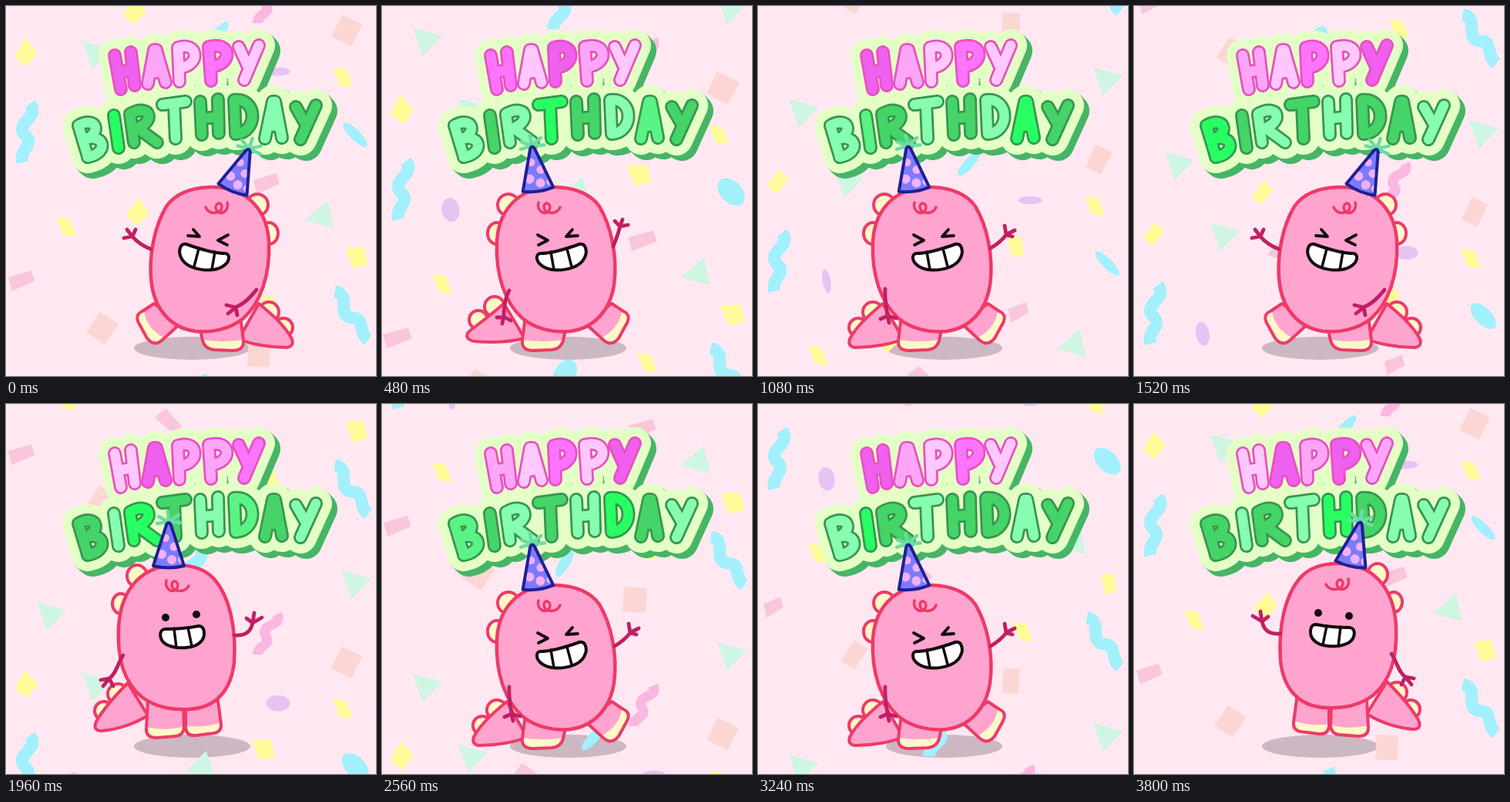
An HTML page with a canvas for the animation above (3840 ms loop, 480 by 480 pixels).

```html
<!DOCTYPE html>
<html lang="en">
<head>
<meta charset="utf-8">
<title>Happy Birthday</title>
<style>
  html, body { margin: 0; width: 100%; height: 100%; overflow: hidden; background: #ffe8f1; }
  canvas { display: block; width: 480px; height: 480px; }
</style>
</head>
<body>
<canvas id="stage" role="img" aria-label="Happy Birthday"></canvas>
<script>
const LOOP = 3840, STEP = 40, FRAMES = LOOP / STEP;
const canvas = document.getElementById('stage');
const ctx = canvas.getContext('2d');
const dpr = window.devicePixelRatio || 1;
canvas.width = canvas.height = 480 * dpr;

const path = d => new Path2D(d);
const TAU = Math.PI * 2;

function stroke(p, color, width) {
  ctx.strokeStyle = color;
  ctx.lineWidth = width;
  ctx.stroke(p);
}
function shape(p, fill, line, width = 4) {
  ctx.fillStyle = fill;
  ctx.fill(p);
  if (line) stroke(p, line, width);
}
function disc(x, y, rx, ry = rx) {
  const p = new Path2D();
  p.ellipse(x, y, rx, ry, 0, 0, TAU);
  return p;
}

// ---------- confetti ----------
const KINDS = {
  yellow: { fill: '#fdfb97', d: path('M-16-12L10-13L16 10L-6 14Z'), flip: 'x' },
  slant: { fill: '#fdfb97', d: path('M-13-12L4-10L13 13L-4 11Z') },
  orange: { fill: '#fcd6d3', d: path('M-16-16H16V16H-16Z'), flip: 'x' },
  pink: { fill: '#f9c6dc', d: path('M-19-4L14-13L19 1L-14 14Z'), flip: 'x' },
  tri: { fill: '#cff5e3', d: path('M-18-16L20-6L-5 21Z') },
  oval: { fill: '#a3f0fd', d: disc(0, 0, 21, 14), flip: 'y' },
  bead: { fill: '#e7c3f3', d: disc(0, 0, 15.5, 11.5), flip: 'y' },
  wave: { line: '#a3f0fd', d: path('M4-38C18-20-16-14-3 2C12 14-10 20-6 38') },
  curl: { line: '#fab7e2', d: path('M3-29C15-16-14-11-3 2C10 12-9 16-5 29') }
};
const CONFETTI = [
  ['yellow', 25, 61, 50], ['yellow', 166, 7, 50], ['yellow', 170, 268, 60],
  ['yellow', 455, 326, 0], ['yellow', 334, 145, 0], ['slant', 437, 92, 0],
  ['slant', 78, 286, 0], ['slant', 344, 388, 0],
  ['orange', 442, 32, 26], ['orange', 125, 418, 33], ['orange', 328, 452, 3],
  ['pink', 20, 356, 0], ['pink', 338, 230, 0], ['pink', 211, 314, 65], ['pink', 190, 86, 50],
  ['tri', 117, 62, 0], ['tri', 411, 272, -55], ['tri', 58, -30, 0],
  ['tri', 453, -71, 0], ['tri', 255, 167, -60],
  ['oval', 453, 167, 45], ['oval', 274, 37, -48], ['oval', 237, 404, -60],
  ['bead', 89, 190, 80], ['bead', 353, 85, 0],
  ['wave', 27, 165, 0], ['wave', 449, 401, -42], ['wave', 238, 515, 16], ['curl', 340, -4, 18]
];
const SPAN = 594, MARGIN = 62;
const dip = (f, at, period, depth) => 1 - depth * (1 + Math.cos(TAU * (f - at) / period));

function drawConfetti(f) {
  const fall = SPAN * f / FRAMES;
  const sx = dip(f, 33, 48, 0.17), sy = dip(f, -3, 32, 0.28);
  ctx.lineCap = 'butt';
  for (const [kind, x, y, angle] of CONFETTI) {
    const k = KINDS[kind];
    ctx.save();
    ctx.translate(x, (y + fall + MARGIN + SPAN) % SPAN - MARGIN);
    ctx.rotate(angle * Math.PI / 180);
    if (k.flip) ctx.scale(k.flip === 'x' ? sx : 1, k.flip === 'y' ? sy : 1);
    if (k.line) stroke(k.d, k.line, kind === 'wave' ? 16 : 13);
    else shape(k.d, k.fill);
    ctx.restore();
  }
}

// ---------- lettering ----------
const HAPPY = [
  'M141 64L149 108M162 60L167 103M146 86L164 83',
  'M184 101L192 57H195L207 99M188 87L203 85',
  'M223 54L225 98M223 54C250 45 253 78 225 80',
  'M263 53L266 97M263 53C292 45 295 76 266 79',
  'M302 53L313 77M328 51L309 96'
].map(path);
const BIRTHDAY = [
  'M94 155L106 195M94 155C117 142 126 165 101 174C126 163 136 190 106 196',
  'M140 142L146 184',
  'M161 141L166 177M161 140C188 125 196 152 165 160M173 160L196 177',
  'M203 128L233 124M218 126L220 172',
  'M252 124L254 167M275 121L276 165M253 146L275 144',
  'M296 122L298 166C328 164 326 118 296 122Z',
  'M336 172L346 124H349L358 171M341 156L354 155',
  'M376 131L388 152M402 129L382 173'
].map(path);
const SIGN = new Path2D();
[...HAPPY, ...BIRTHDAY].forEach(p => SIGN.addPath(p));

const PINKS = { m: '#f060ee', h: '#ff74fd', l: '#fda6f8', p: '#ffc8fd' };
const GREENS = { d: '#45d468', m: '#5bf386', l: '#86fdb0' };
const HOT = '#27ff62';
const LOOKS = [
  ['mlphp', 'lldlddld'], ['hpmlp', 'ldlldlmd'], ['mlphp', 'lmdldlld'],
  ['pmllh', 'dlddlmdl'], ['lphpm', 'mdldlddl'], ['pmlml', 'dldlddll']
];
const ORDER = '05143214530541350145';

function word(letters, line, colorOf) {
  letters.forEach((p, i) => {
    stroke(p, line, 18);
    stroke(p, colorOf(i), 12.5);
  });
}
function drawSign(f) {
  const step = Math.floor(f / 5);
  const [pinks, greens] = LOOKS[ORDER[step]];
  const hot = (step + 1) % 8;
  ctx.lineCap = ctx.lineJoin = 'round';
  for (let i = 7; i > 0; i--) {
    ctx.save();
    ctx.translate(i, i);
    stroke(SIGN, '#47b566', 42);
    ctx.restore();
  }
  stroke(SIGN, '#e4ffc6', 42);
  word(HAPPY, '#e94fc4', i => PINKS[pinks[i]]);
  word(BIRTHDAY, '#36964f', i => i === hot ? HOT : GREENS[greens[i]]);
}

// ---------- dancer ----------
const LINE = '#ee3a68', SKIN = '#ffa3cf', CREAM = '#fff8c8', ARM = '#c21f63', INK = '#140a0e';

const DOWN = {
  axis: 245,
  body: path('M226 235C185 233 152 258 149 305C147 350 160 385 182 405C200 420 225 424 244 422C275 418 296 395 301 362C306 325 297 285 282 260C270 243 250 236 226 235Z'),
  spikes: [disc(164, 258, 14), disc(149, 295, 12, 14)],
  tail: path('M162 386C145 400 128 415 119 432Q116 442 126 443C150 443 175 438 188 432Z'),
  plates: [disc(130, 417, 12), disc(149, 397, 13)],
  legs: [
    ['M186 403L182 434Q181 447 196 447L220 446Q232 445 235 434L239 416Z', 'M182 434Q181 447 196 447L220 446Q232 445 235 433Q210 437 182 433Z'],
    ['M264 412L288 434Q298 442 307 431L318 411Q323 400 313 396L298 386Z', 'M284 431Q298 442 307 431L318 411Q323 400 311 396Q308 418 284 431Z']
  ].map(l => l.map(path)),
  wave: path('M302 314Q314 307 322 297M322 297L320 285M323 296L333 291M322 297L330 299'),
  rest: path('M165 367C164 380 167 392 168 402M168 402L159 406M168 402L170 411M168 402L179 405'),
  hair: path('M203 255C200 266 212 273 217 265C221 257 211 252 210 260C210 271 228 271 231 261'),
  eyes: path('M202 297L215 304L203 310M247 290L239 299L254 298'),
  mouth: path('M205 321C220 321 245 313 256 309C264 307 267 318 263 326C256 342 225 347 209 338C199 332 199 322 205 321Z'),
  teeth: path('M219 319L223 342M240 315L246 338')
};
const SETTLE = {
  ...DOWN,
  tail: path('M158 386C140 402 122 415 112 423Q106 432 120 435C140 437 165 436 185 431Z'),
  plates: [disc(125, 407, 12), disc(146, 390, 13)],
  wave: path('M300 312C304 302 307 294 309 285M309 286L302 279M309 286L312 277M309 286L319 284'),
  rest: path('M165 369C159 380 158 392 158 404M158 404L149 404M158 403L156 412M158 403L167 408')
};
const DOWN_RIGHT = {
  ...DOWN,
  wave: path('M303 315Q318 309 326 299M326 299L322 290M326 299L333 290M326 299L337 301'),
  rest: path('M165 368C173 378 182 388 194 391M192 391L204 388M192 391L202 399M192 391L190 401')
};
const UP = {
  axis: 243,
  open: true,
  body: path('M222 209C178 209 149 238 146 290C144 335 155 362 176 380C195 394 215 397 238 396C272 394 292 372 296 335C299 290 290 250 270 227C258 214 240 209 222 209Z'),
  spikes: [disc(170, 223, 13, 14), disc(149, 259, 11, 13)],
  tail: path('M158 362C140 380 125 398 117 412Q112 424 124 424C148 422 170 413 184 404Z'),
  plates: [disc(127, 398, 12), disc(145, 376, 13)],
  legs: [
    ['M184 385L182 422Q182 433 195 433L220 431Q230 430 231 420L230 392Z', 'M182 419Q182 433 195 433L220 431Q230 430 231 418Q208 425 182 419Z'],
    ['M233 392L233 420Q234 431 246 430L270 427Q280 425 279 415L274 378Z', 'M233 417Q234 431 246 430L270 427Q280 425 279 413Q256 421 233 417Z']
  ].map(l => l.map(path)),
  wave: path('M296 300C308 301 318 297 320 283M320 284L312 278M320 284L322 271M320 284L332 277'),
  rest: path('M152 326C144 338 143 350 134 356M134 356L123 358M134 356L126 366M134 356L139 366'),
  hair: path('M208 229C205 240 217 247 222 239C226 231 216 226 215 234C215 245 233 245 237 236'),
  eyes: [disc(207, 277, 5), disc(247, 273, 5)],
  mouth: path('M206 292C222 292 240 290 250 288C258 288 259 300 254 307C245 319 220 318 208 312C198 306 198 293 206 292Z'),
  teeth: path('M218 291L221 316M236 290L241 314')
};

const HAT = path('M-20 0Q0 5 20 0L3-53Q0-59-3-53Z');
const DOTS = [[-4, -36, 5], [7, -25, 5.5], [-9, -15, 6], [4, -8, 6], [17, -8, 5]];
const POM = path('M0-57L-1-71M0-57L-13-64M0-57L13-66M0-57L-15-55M0-57L16-56');

function drawHat(x, y, angle) {
  ctx.save();
  ctx.translate(x, y);
  ctx.rotate(angle * Math.PI / 180);
  stroke(POM, '#6ddca4', 4.5);
  shape(HAT, '#7c7bfd');
  ctx.save();
  ctx.clip(HAT);
  for (const d of DOTS) shape(disc(...d), '#f2b0f4');
  ctx.restore();
  stroke(HAT, '#1f1f96', 4);
  ctx.restore();
}

function drawDancer(f) {
  const phase = f % 9, right = f % 18 < 9, up = phase > 3;
  const pose = up ? UP : phase === 3 ? SETTLE : right ? DOWN_RIGHT : DOWN;
  ctx.save();
  if (up && phase > 4) ctx.translate(0, -2);
  ctx.save();
  if (right) {
    ctx.translate(pose.axis * 2, 0);
    ctx.scale(-1, 1);
  }
  for (const p of [...pose.plates, ...pose.spikes]) shape(p, CREAM, LINE);
  shape(pose.tail, SKIN, LINE);
  for (const [leg, sole] of pose.legs) {
    shape(leg, SKIN);
    shape(sole, CREAM);
    stroke(leg, LINE, 4);
  }
  shape(pose.body, SKIN, LINE, 4.5);
  stroke(pose.hair, LINE, 3.6);
  if (pose.open) pose.eyes.forEach(p => shape(p, INK));
  else stroke(pose.eyes, INK, 3.8);
  shape(pose.mouth, '#fff', INK);
  stroke(pose.teeth, INK, 3.5);
  stroke(pose.wave, ARM, 4.8);
  stroke(pose.rest, ARM, 4.8);
  ctx.restore();
  if (right) up ? drawHat(281, 210, 13) : drawHat(294, 238, 22);
  else up ? drawHat(211, 210, 0) : drawHat(202.5, 238, -8);
  ctx.restore();
}

// ---------- playback ----------
const SHADOW = disc(241.5, 444, 75.5, 15);

function render(f) {
  ctx.setTransform(dpr, 0, 0, dpr, 0, 0);
  ctx.fillStyle = '#ffe8f1';
  ctx.fillRect(0, 0, 480, 480);
  shape(SHADOW, '#cbb8c2');
  drawConfetti(f);
  drawSign(f);
  drawDancer(f);
}

let start;
function tick(now) {
  start ??= now;
  render(Math.floor(Math.max(0, now - start) % LOOP / STEP));
  requestAnimationFrame(tick);
}
render(0);
requestAnimationFrame(tick);
</script>
</body>
</html>
```
